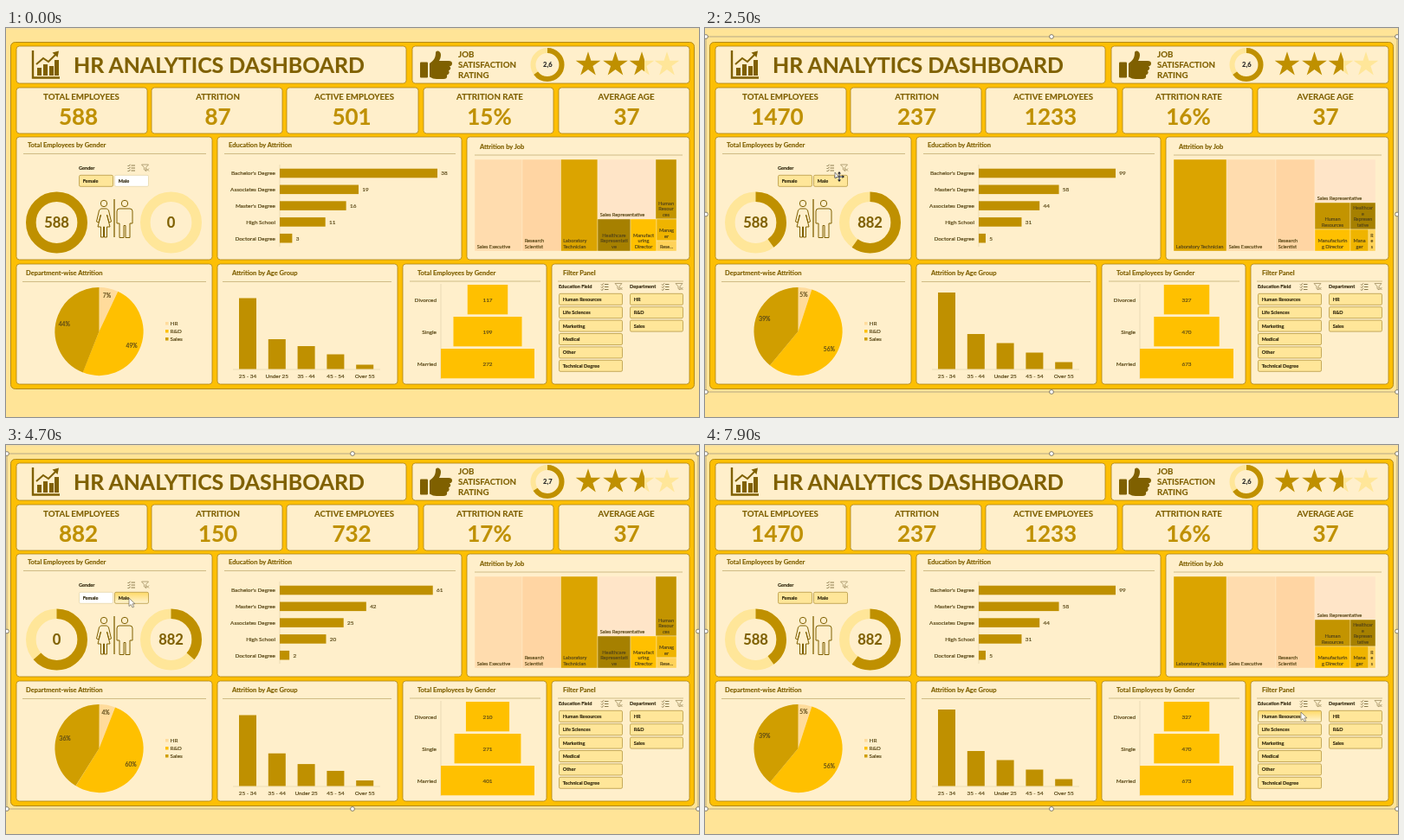
An HTML page for the animation above (8 s loop, 800 by 450 pixels).

```html
<!DOCTYPE html>
<html lang="en">
<head>
<meta charset="utf-8">
<title>HR Analytics Dashboard</title>
<style>
html, body { margin: 0; width: 100%; height: 100%; overflow: hidden; background: #ffe497; }
svg { display: block; width: 800px; height: 450px; font-family: Lato, sans-serif; }
</style>
</head>
<body>
<svg viewBox="0 0 800 450"><g id="base"></g><g id="live"></g></svg>
<script>
const LOOP = 8000;
const CHART_MS = 500, JOBS_DELAY = 150, JOBS_MS = 700;
const DARK = '#7f6000', GOLD = '#bf9000', AMBER = '#ffc000', PALE = '#ffe699', PANEL = '#ffefcb', INK = '#594817';
const PIE = ['#ffdb9b', AMBER, '#d09e00'];

const rect = (x, y, w, h, fill, extra = '') =>
  `<rect x="${x}" y="${y}" width="${Math.max(0, w)}" height="${Math.max(0, h)}" fill="${fill}" ${extra}/>`;
const text = (x, y, s, size, fill = INK, anchor = 'start', weight = 500) =>
  `<text x="${x}" y="${y}" font-size="${size}" fill="${fill}" stroke="${fill}" stroke-width=".15"
    text-anchor="${anchor}" font-weight="${weight}">${s}</text>`;
const path = (d, fill, stroke = 'none', width = 1) =>
  `<path d="${d}" fill="${fill}" stroke="${stroke}" stroke-width="${width}"/>`;
// Ring segment: start and length are fractions of a turn, clockwise from the top.
const ring = (cx, cy, r, width, start, len, color) =>
  `<circle cx="${cx}" cy="${cy}" r="${r}" fill="none" stroke="${color}" stroke-width="${width}" pathLength="100"
    stroke-dasharray="${len * 100} ${100 - len * 100}" transform="rotate(${start * 360 - 90} ${cx} ${cy})"/>`;
const mix = (a, b, k) => a + (b - a) * k;
const mixAll = (a, b, k) => a.map((v, i) => mix(v, b[i], k));
const easeOut = u => 1 - (1 - Math.min(1, Math.max(0, u))) ** 2;

const EDU = { a: 'Associates Degree', b: "Bachelor's Degree", m: "Master's Degree", h: 'High School', d: 'Doctoral Degree' };
const JOB_COLORS = { exec: '#ffdcae', sci: '#ffd5a3', lab: '#dba400', rep: '#ffe5c8', hr: '#c39400',
  care: '#a68000', manu: AMBER, mgr: '#efb400', dir: '#ffd25a' };

// Each job tile: left, top, right, bottom, label lines split by "/".
const STATES = {
  female: {
    kpi: [588, 87, 501, '15%', 37], counts: [588, 0], rings: [1, 0], rating: 2.6, on: [1, 0],
    eduOrder: 'bamhd', edu: [38, 19, 16, 11, 3], eduScale: 4.79,
    ages: ['25 - 34', 'Under 25', '35 - 44', '45 - 54', 'Over 55'], cols: [82, 34.5, 26.5, 17, 5],
    funnel: [117, 199, 272], pie: [7, 49, 44],
    jobs: {
      exec: [541, 152, 596, 258, 'Sales Executive'], sci: [596, 152, 640.5, 258, 'Research/Scientist'],
      lab: [640.5, 152, 683, 258, 'Laboratory/Technician'], rep: [683, 152, 750, 221, 'Sales Representative'],
      hr: [750, 152, 774, 221, 'Human/Resour/ces'], care: [683, 221, 721, 258, 'Healthcare/Representati/ve'],
      manu: [721, 221, 751, 258, 'Manufact/uring/Director'], mgr: [751, 221, 774, 246, 'Manag/er'],
      dir: [751, 246, 774, 258, 'Rese...']
    }
  },
  all: {
    kpi: [1470, 237, 1233, '16%', 37], counts: [588, 882], rings: [.4, .6], rating: 2.6, on: [1, 1],
    eduOrder: 'bmahd', edu: [99, 58, 44, 31, 5], eduScale: 1.596,
    ages: ['25 - 34', '35 - 44', 'Under 25', '45 - 54', 'Over 55'], cols: [88.5, 40.5, 30, 19, 8],
    funnel: [327, 470, 673], pie: [5, 56, 39],
    jobs: {
      exec: [602, 152, 659, 258, 'Sales Executive'], sci: [659, 152, 704, 258, 'Research/Scientist'],
      lab: [541, 152, 602, 258, 'Laboratory Technician'], rep: [704, 152, 774, 202, 'Sales Representative'],
      hr: [704, 202, 745, 233, 'Human/Resources'], care: [745, 202, 774, 233, 'Healthcar/e/Represen/tative'],
      manu: [704, 233, 745, 258, 'Manufacturin/g Director'], mgr: [745, 233, 766, 258, 'Mana/ger'],
      dir: [766, 233, 774, 258, 'R/e/s']
    }
  },
  male: {
    kpi: [882, 150, 732, '17%', 37], counts: [0, 882], rings: [0, 1], rating: 2.7, on: [0, 1],
    eduOrder: 'bmahd', edu: [61, 42, 25, 20, 2], eduScale: 2.745,
    ages: ['25 - 34', '35 - 44', 'Under 25', '45 - 54', 'Over 55'], cols: [82, 43.5, 23.5, 18.5, 9],
    funnel: [210, 271, 401], pie: [4, 60, 36],
    jobs: {
      exec: [612, 152, 671, 258, 'Sales Executive'], sci: [671, 152, 736, 227, 'Research Scientist'],
      lab: [541, 152, 612, 258, 'Laboratory Technician'], rep: [736, 152, 774, 227, 'Sales/Representati/ve'],
      hr: [671, 227, 701, 258, 'Human/Resources'], care: [733, 227, 753, 258, 'Healt/hcare/Repre/sent...'],
      manu: [701, 227, 733, 258, 'Manufact/uring/Director'], mgr: [753, 227, 774, 249, 'Mana/ger'],
      dir: [753, 249, 774, 258, 'Res']
    }
  }
};
const STEPS = [[0, 'female'], [1600, 'all'], [3100, 'female'], [4600, 'male'], [6100, 'all']];
const POINTER = [[400, 225, 404], [1000, 141, 168], [1700, 141, 168], [2200, 155, 172], [2600, 155, 172],
  [3000, 118, 177], [4000, 118, 177], [4400, 142, 177], [5600, 142, 177], [6000, 110, 178],
  [6900, 110, 178], [7700, 688, 309], [8000, 688, 309]];
const SELECT_AT = 1500, MOVE_SHAPE = [2000, 2700];

const column = (x, w, labels) => labels.map((label, i) => ({ x, y: 307 + i * 15.4, w, label }));
const BUTTONS = [
  { x: 84, y: 170, w: 40, label: 'Female', gender: 0 }, { x: 125, y: 170, w: 40, label: 'Male', gender: 1 },
  ...column(638, 74, ['Human Resources', 'Life Sciences', 'Marketing', 'Medical', 'Other', 'Technical Degree']),
  ...column(720, 62, ['HR', 'R&amp;D', 'Sales'])
];

function star(cx, fill) {
  let d = '';
  for (let i = 0; i < 10; i++) {
    const r = i % 2 ? 5.7 : 15, a = i * Math.PI / 5;
    d += `${i ? 'L' : 'M'}${(cx + r * Math.sin(a)).toFixed(1)} ${(42.3 - r * Math.cos(a)).toFixed(1)}`;
  }
  return path(d + 'Z', fill);
}

function slicerIcons(x, y) {
  let s = '';
  for (let i = 0; i < 3; i++)
    s += path(`M${x} ${y + 1 + i * 3}l1 1 2-2.2M${x + 4} ${y + 1 + i * 3}h4.5`, 'none', '#6d5b2c', .8);
  return s + path(`M${x + 16} ${y}h8l-3 3.4v4l-2-1.4v-2.6zM${x + 21.5} ${y + 4.5}l3 3m0-3l-3 3`, 'none', '#a08f60', .8);
}

function drawBase() {
  const panel = (x, y, x2, y2) => rect(x, y, x2 - x, y2 - y, PANEL, 'rx="3.5" stroke="#a98216" stroke-width=".8"');
  const title = (x, y, s, x1, x2) => text(x, y, s, 7.5, DARK, 'start', 700) +
    path(`M${x1} ${y + 7.5}H${x2}`, 'none', '#c3ae74', .8);
  let s = rect(0, 0, 800, 450, '#ffe497') + rect(0, 0, 800, 1.5, '#f5dfa4') +
    rect(5.5, 16.5, 789, 401, '#fdbf04', 'rx="5" stroke="#a98216" stroke-width=".9"');
  s += panel(12, 21, 462, 64) + panel(469, 21, 789, 64);
  for (const [a, b] of [[12, 163], [168, 319], [324, 476], [482, 632], [638, 789]]) s += panel(a, 69, b, 122);
  for (const [a, b] of [[12, 238], [244, 526], [532, 789]]) s += panel(a, 126, b, 268);
  for (const [a, b] of [[12, 238], [244, 452], [458, 624], [630, 789]]) s += panel(a, 273, b, 412);

  s += path('M31 26V57.5H62', 'none', DARK, 2.4);
  [[36, 46, 9], [43, 42, 13], [50, 44, 11], [56, 37, 18]].forEach(([x, y, h]) => s += rect(x, y, 5, h, DARK));
  s += path('M35 42l8-7 6 4 9-9', 'none', DARK, 2) + path('M53.5 28.5L61 26.5 59.5 34z', DARK);
  s += text(78, 52, 'HR ANALYTICS DASHBOARD', 24.9, DARK, 'start', 700);
  s += rect(478, 39.5, 9, 18, DARK, 'rx="1"') +
    path('M489 41c4-3 7-6 7-12 0-4 6-3 6 2 0 3-1 5-2 7h11q4 0 4 3t-3 3.2q3 3-1 5.2 2 3.4-2 5 1 4.6-4 4.6h-8q-4 0-8-2.5z', DARK);
  ['JOB', 'SATISFACTION', 'RATING'].forEach((w, i) => s += text(522, 34 + i * 12, w, 9.7, DARK, 'start', 700));
  s += `<defs><linearGradient id="part"><stop offset=".6" stop-color="${GOLD}"/><stop offset=".6" stop-color="${PALE}"/></linearGradient>
    <linearGradient id="hover" x2="0" y2="1"><stop stop-color="#ffd966"/><stop offset="1" stop-color="#fff4d2"/></linearGradient></defs>`;
  s += star(672, GOLD) + star(703.5, GOLD) + star(734, 'url(#part)') + star(763, PALE);

  const names = ['TOTAL EMPLOYEES', 'ATTRITION', 'ACTIVE EMPLOYEES', 'ATTRITION RATE', 'AVERAGE AGE'];
  [87, 244.5, 402, 558.5, 716].forEach((x, i) => s += text(x, 82.7, names[i], 9.7, DARK, 'middle', 700));

  s += title(25, 138, 'Total Employees by Gender', 20, 231) + title(257, 138, 'Education by Attrition', 252, 519) +
    title(547, 139.5, 'Attrition by Job', 541, 781) + title(23, 286, 'Department-wise Attrition', 19, 231) +
    title(261, 286, 'Attrition by Age Group', 250, 445) + title(475, 285.5, 'Total Employees by Gender', 466, 617) +
    title(643, 285.5, 'Filter Panel', 637, 782);
  for (const [x, y, w] of [[84, 163.5, 'Gender'], [638, 301, 'Education Field'], [720, 301, 'Department']])
    s += text(x, y, w, 5.6, '#2f260c', 'start', 700);
  s += slicerIcons(140.5, 158) + slicerIcons(687, 295.5) + slicerIcons(757, 295.5);

  s += ring(113, 203, 3.7, 1, 0, 1, DARK) + ring(137, 203, 3.7, 1, 0, 1, DARK) +
    path('M125 198V242', 'none', DARK, 1.3) +
    path('M109.500 209h7l2 2 3 13-2.500 1-2.500-9 3.500 14h-3.500v12h-3v-12h-1v12h-3v-12H106l3.500-14-2.500 9-2.500-1 3-13z', 'none', DARK) +
    path('M131 209h12q3 0 3 3v14h-3v16.500h-5v-14h-2v14h-5v-16.500h-3v-14q0-3 3-3z', 'none', DARK);

  s += path('M316 158V253M262 395H432M502 296V406', 'none', '#e2d5ad', .7);
  ['Divorced', 'Single', 'Married'].forEach((w, i) => s += text(497, 316.5 + i * 37, w, 6.4, INK, 'end'));
  ['HR', 'R&amp;D', 'Sales'].forEach((w, i) =>
    s += rect(184, 340 + i * 9, 3.5, 3.5, PIE[i]) + text(189.5, 344.2 + i * 9, w, 6.4));
  document.getElementById('base').innerHTML = s;
}

function drawJobs(from, to, age) {
  const k = easeOut((age - JOBS_DELAY) / JOBS_MS), named = k ? to : from;
  let tiles = '', labels = '';
  for (const id in to.jobs) {
    const [x, y, x2, y2] = mixAll(from.jobs[id].slice(0, 4), to.jobs[id].slice(0, 4), k);
    tiles += rect(x, y, x2 - x, y2 - y, JOB_COLORS[id], 'stroke="#fff0cd" stroke-width=".4"');
    const lines = named.jobs[id][4].split('/');
    const centered = !['exec', 'sci', 'lab'].includes(id) && lines[0] !== 'Sales Representative';
    const size = id === 'dir' || lines.length > 3 ? 5.3 : 5.7;
    lines.forEach((line, i) => labels += text(centered ? (x + x2) / 2 : x + 2.7,
      y2 - 3.5 - (lines.length - 1 - i) * 6.4, line, size, INK, centered ? 'middle' : 'start'));
  }
  return tiles + labels;
}

function drawCharts(from, to, age) {
  const k = easeOut(age / CHART_MS);
  let s = ring(625, 42.5, 16.5, 6, 0, 1, PALE) +
    ring(625, 42.5, 16.5, 6, 0, mix(from.rating, to.rating, k) / 4, GOLD) +
    text(625.3, 45.2, to.rating.toFixed(1).replace('.', ','), 7.5, '#222', 'middle', 700);
  [83.5, 244.5, 399, 558, 716.5].forEach((x, i) => s += text(x, 111.7, to.kpi[i], 26, GOLD, 'middle', 700));

  [58.5, 190.5].forEach((x, i) => s += ring(x, 225, 29.7, 11.6, 0, 1, PALE) +
    ring(x, 225, 29.7, 11.6, 0, mix(from.rings[i], to.rings[i], k), GOLD) +
    text(x, 231, to.counts[i], 16.5, DARK, 'middle', 700));

  to.edu.forEach((v, i) => {
    const y = 168 + i * 18.8, w = mix(from.edu[i] * from.eduScale, v * to.eduScale, k);
    s += rect(316, y - 5.3, w, 10.6, GOLD) + text(311, y + 2.3, EDU[to.eduOrder[i]], 6.4, INK, 'end') +
      text(320.3 + w, y + 2.3, v, 6.4);
  });

  mixAll(from.cols, to.cols, k).forEach((h, i) => {
    const x = 279 + i * 33.8;
    s += rect(x - 10, 394.5 - h, 20, h, GOLD) + text(x, 404.8, to.ages[i], 6.4, INK, 'middle');
  });

  to.funnel.forEach((v, i) => {
    const w = mix(from.funnel[i] / from.funnel[2], v / to.funnel[2], k) * 108;
    s += rect(556 - w / 2, 297 + i * 37, w, 34.3, AMBER) + text(556, 316.5 + i * 37, v, 6.4, INK, 'middle');
  });

  let start = 0, labels = '';
  mixAll(from.pie, to.pie, k).forEach((v, i) => {
    const len = v / 100, a = (start + len / 2) * 2 * Math.PI;
    s += ring(107.5, 351, 25.5, 51, start, len, PIE[i]);
    labels += text(107.5 + 41 * Math.sin(a), 353.3 - 42.5 * Math.cos(a), to.pie[i] + '%', 6.7, INK, 'middle');
    start += len;
  });
  return s + labels;
}

function pointerAt(t) {
  const i = POINTER.findIndex(p => p[0] > t);
  if (i < 1) return null;
  const [a, b] = [POINTER[i - 1], POINTER[i]], u = (t - a[0]) / (b[0] - a[0]);
  const k = u * u * (3 - 2 * u);
  return { x: mix(a[1], b[1], k), y: mix(a[2], b[2], k), move: t >= MOVE_SHAPE[0] && t < MOVE_SHAPE[1] };
}

function drawButtons(on, p) {
  return BUTTONS.map(b => {
    const over = p && !p.move && p.x >= b.x && p.x <= b.x + b.w && p.y >= b.y - 3 && p.y <= b.y + 13;
    const active = b.gender === undefined || on[b.gender];
    const fill = over ? 'url(#hover)' : active ? PALE : '#fff';
    const edge = active || over ? '#b79a45' : '#e6d8ac';
    return rect(b.x + .5, b.y + .3, b.w - 1, 13, fill, `rx="1.5" stroke="${edge}" stroke-width=".8"`) +
      text(b.x + 4.7, b.y + 8.8, b.label, 5.6, '#2f260c', 'start', 700);
  }).join('');
}

function drawSelection() {
  let s = rect(1, 10, 798, 411, 'none', 'stroke="#a39a80" stroke-width=".8"');
  for (const x of [1, 400, 799]) for (const y of [10, 215.5, 421])
    if (x !== 400 || y !== 215.5) s += `<circle cx="${x}" cy="${y}" r="2.4" fill="#fff" stroke="#77705c" stroke-width=".9"/>`;
  return s;
}

function drawPointer({ x, y, move }) {
  const arrow = path('M0 0V9.5l2.3-2 1.7 3.5 1.7-.8-1.7-3.4h3z', '#fff', '#6b6350', .7);
  const head = path('M0-6l2 2.5H-2z', '#222');
  const plus = 'M-4.5 0h9M0-4.5v9';
  const cross = path(plus, 'none', '#fff', 2.2) + path(plus, 'none', '#222', 1) +
    [0, 90, 180, 270].map(a => `<g transform="rotate(${a})">${head}</g>`).join('') +
    path('M-5-5V2l1.7-1.5H-.5z', '#fff', '#444', .6);
  return `<g transform="translate(${x} ${y})">${move ? cross : arrow}</g>`;
}

const live = document.getElementById('live');
function draw(t) {
  const i = STEPS.findLastIndex(step => step[0] <= t);
  const to = STATES[STEPS[i][1]], from = i ? STATES[STEPS[i - 1][1]] : to;
  const age = t - STEPS[i][0], p = pointerAt(t);
  live.innerHTML = drawCharts(from, to, age) + drawJobs(from, to, age) + drawButtons(to.on, p) +
    (t >= SELECT_AT ? drawSelection() : '') + (p ? drawPointer(p) : '');
}

drawBase();
draw(0);
const began = performance.now();
function tick() {
  draw((performance.now() - began) % LOOP);
  requestAnimationFrame(tick);
}
requestAnimationFrame(tick);
</script>
</body>
</html>
```
